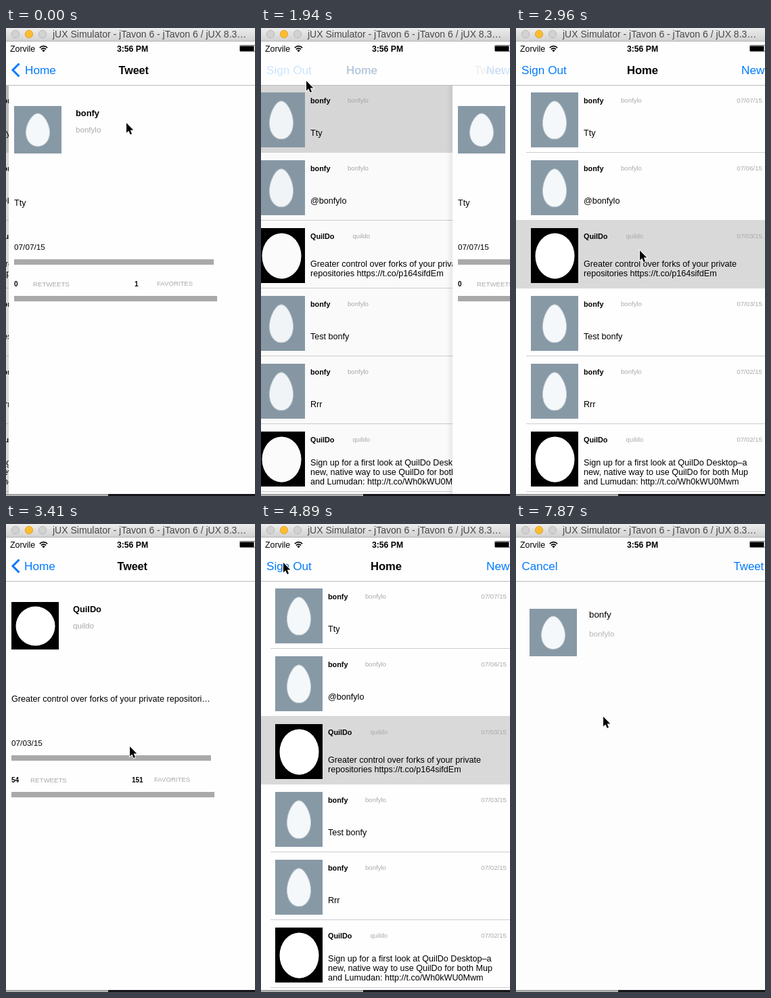
These frames come from a looping animation (368x690 px, 8000 ms). An HTML page:

```html
<!DOCTYPE html>
<html lang="en">
<head>
<meta charset="utf-8">
<title>Timeline app</title>
<style>
html, body { margin: 0; width: 100%; height: 100%; overflow: hidden; background: #fefefe; }
svg { display: block; width: 368px; height: 690px; }
text { font-family: "Liberation Sans", Arial, sans-serif; white-space: pre; }
</style>
</head>
<body>
<svg id="stage" viewBox="0 0 368 690" xmlns="http://www.w3.org/2000/svg"></svg>
<script>
const LOOP = 8000, STEP = 148.1, WIDTH = 375, HEIGHT = 667;
const BLUE = '#007aff', GRAY = '#a9a9a9', PAGE = '#fefefe';

const USERS = {
  egg: { name: 'bonfy', handle: 'bonfylo', handleX: 155 },
  dev: { name: 'QuilDo', handle: 'quildo', handleX: 162.5 }
};
const ROWS = [
  ['egg', '07/07/15', 'Tty'],
  ['egg', '07/06/15', '@bonfylo'],
  ['dev', '07/03/15', 'Greater control over forks of your private', 'repositories https://t.co/p164sifdEm'],
  ['egg', '07/03/15', 'Test bonfy'],
  ['egg', '07/02/15', 'Rrr'],
  ['dev', '07/02/15', 'Sign up for a first look at QuilDo Desktop–a',
    'new, native way to use QuilDo for both Mup', 'and Lumudan: http://t.co/Wh0kWU0Mwm']
];
// Pointer path: time, x, y
const POINTER = [
  [0, 178, 140], [1200, 178, 140], [1481, 60, 78], [1629, 30, 60], [1777, 32, 61],
  [1925, 67, 78], [2221, 165, 275], [2370, 173, 290], [2518, 178, 312], [2666, 183, 328],
  [3860, 183, 328], [3999, 150, 262], [4147, 30, 59], [4443, 30, 59], [4887, 33, 57],
  [5340, 33, 57], [5480, 250, 66], [5628, 339, 60], [6366, 339, 60], [6812, 250, 150],
  [6960, 223, 194], [7109, 165, 235], [7257, 135, 257], [7570, 135, 257],
  [7702, 131, 275], [7850, 129, 284]
];

const tag = (name, attrs, body = '') =>
  `<${name} ${Object.entries(attrs).map(([k, v]) => `${k}="${v}"`).join(' ')}>${body}</${name}>`;
const rect = (x, y, width, height, fill, more = {}) => tag('rect', { x, y, width, height, fill, ...more });
const text = (x, y, str, size, fill = '#000', more = {}) =>
  tag('text', { x, y, 'font-size': size, fill, ...more }, str);
const bold = (x, y, str, size, more = {}) => text(x, y, str, size, '#000', { 'font-weight': 700, ...more });
const group = (id, body, more = {}) => tag('g', { id, ...more }, body);

function avatar(kind, x, y, sy = 1) {
  const art = kind === 'egg'
    ? rect(0, 0, 70, 70, '#8899a6') + tag('path', { fill: '#f5f8fa', stroke: '#c3cdd4', 'stroke-width': .9,
        d: 'M35 11C43 11 52.5 26 52.5 39C52.5 51 45 59.5 35 59.5S17.5 51 17.5 39C17.5 26 27 11 35 11Z' })
    : rect(0, 0, 70, 70, '#000') + tag('circle', { cx: 35.5, cy: 35.5, r: 29, fill: '#fff' });
  return tag('g', { transform: `translate(${x} ${y}) scale(1 ${sy})` }, art);
}

function row([kind, date, ...lines], i) {
  const user = USERS[kind], y = 84 + i * 100;
  return rect(15, y + 99, 360, 1, '#cdcdd0') +
    rect(0, y - 1, WIDTH, 101, '#d9d9d9', { class: 'mark', visibility: 'hidden' }) +
    avatar(kind, 22, y + 11, 81 / 70) +
    bold(100, y + 26.5, user.name, 10.8) +
    text(user.handleX, y + 26, user.handle, 9.6, GRAY) +
    text(364, y + 26, date, 9.7, GRAY, { 'text-anchor': 'end' }) +
    lines.map((s, n) => text(100, y + 75 - 7 * (lines.length - 1) + 14 * n, s, 12.6)).join('');
}

function detail(id, kind, str, date, retweets, favorites) {
  const user = USERS[kind];
  return group(id, avatar(kind, 8, 115) +
    bold(99, 130, user.name, 12.8) +
    text(99, 154, user.handle, 11.6, GRAY) +
    text(8, 262, str, 12.6) +
    text(8, 327, date, 11.8) +
    rect(8, 341, 295, 8, GRAY) + rect(8, 395, 300, 8, GRAY) +
    bold(8, 380.5, retweets, 10) + text(36, 380.5, 'RETWEETS', 9.7, GRAY) +
    bold(186, 380.5, favorites, 10) + text(219, 379.5, 'FAVORITES', 9.6, GRAY));
}

const navLine = rect(0, 84, WIDTH, 1, '#bcbcbe');
const stage = document.getElementById('stage');

stage.innerHTML = `<defs>
  <linearGradient id="bar" x2="0" y2="1"><stop stop-color="#ededed"/><stop offset="1" stop-color="#d2d2d2"/></linearGradient>
  <linearGradient id="edge"><stop stop-opacity="0"/><stop offset="1" stop-opacity=".07"/></linearGradient>
  <linearGradient id="under" x2="0" y2="1"><stop stop-color="#8f8f8f"/><stop offset="1" stop-color="#c4c4c4"/></linearGradient>
  <clipPath id="screen"><rect y="20" width="368" height="667"/></clipPath></defs>` +
  rect(0, 0, 368, 690, PAGE) +
  group('app',
    group('list', rect(0, 84, 490, 603, PAGE) + ROWS.map(row).join('')) +
    rect(0, 84, 368, 603, '#000', { id: 'dim' }) +
    group('tweet', rect(-9, 84, 9, 603, 'url(#edge)') + rect(0, 84, WIDTH, 603, PAGE) +
      detail('first', 'egg', 'Tty', '07/07/15', 0, 1) +
      detail('second', 'dev', 'Greater control over forks of your private repositori…', '07/03/15', 54, 151)) +
    rect(0, 20, 368, 65, PAGE) + navLine +
    group('signOut', text(8, 68, 'Sign Out', 17.2, BLUE)) +
    group('compose', text(333, 68, 'New', 17.2, BLUE)) +
    group('chevron', tag('path', { d: 'M19.5 52.5L10 62L19.5 71.5', fill: 'none', stroke: BLUE, 'stroke-width': 3 })) +
    group('back', text(27, 68, 'Home', 17.2, BLUE)) +
    group('home', bold(164, 68, 'Home', 16.6)) +
    group('title', bold(164.5, 68, 'Tweet', 16.1)) +
    group('modal', rect(0, 20, WIDTH, HEIGHT, '#fdfdfd') + navLine +
      text(8.5, 68, 'Cancel', 17, BLUE) + text(321.5, 68, 'Tweet', 16.8, BLUE) +
      avatar('egg', 20, 125) +
      text(108, 137.5, USERS.egg.name, 13.3) + text(108, 166, USERS.egg.handle, 11.6, '#b4b4b4')),
    { 'clip-path': 'url(#screen)' }) +
  // status bar
  text(6, 34.5, 'Zorvile', 12.4) + bold(164, 34.5, '3:56 PM', 12.2) +
  tag('path', { d: 'M49.8 29.2Q55.5 24 61.2 29.2M51.9 31.5Q55.5 28.3 59.1 31.5', fill: 'none', stroke: '#000', 'stroke-width': 1.7 }) +
  tag('path', { d: 'M53.3 33Q55.5 31 57.7 33L55.5 35.4Z' }) +
  rect(345.5, 25.5, 24, 9, '#fff', { stroke: '#777', rx: 1 }) + rect(346, 26.5, 20.5, 7.5, '#000') +
  // window frame
  rect(0, 0, 368, 19, 'url(#bar)') + rect(0, 19, 368, 1, '#b4b4b4') +
  ['#d2d2d2', '#fdbd2e', '#d2d2d2'].map((fill, i) => tag('circle',
    { cx: 14 + 20 * i, cy: 9, r: 5.6, fill, stroke: i === 1 ? '#dfa023' : '#b4b4b4', 'stroke-width': .9 })).join('') +
  text(69, 14, 'jUX Simulator - jTavon 6 - jTavon 6 / jUX 8.3…', 14, '#484848') +
  rect(0, 687, 368, 3, 'url(#under)') + rect(151, 687, 217, 3, '#17161a') +
  group('pointer', tag('path', { d: 'M0 0V14.5L3.3 11.5L5.7 17L8 16L5.7 10.6H10.3Z',
    stroke: '#fff', 'stroke-width': 1.8, 'paint-order': 'stroke' }));

const el = {};
stage.querySelectorAll('[id]').forEach(node => el[node.id] = node);
const marks = [...stage.querySelectorAll('.mark')];

const clamp = v => Math.max(0, Math.min(1, v));
const move = (node, x, y = 0) => node.setAttribute('transform', `translate(${Math.round(x)} ${Math.round(y)})`);
const fade = (node, a) => node.setAttribute('opacity', clamp(a).toFixed(3));
const show = (node, on) => node.setAttribute('visibility', on ? 'visible' : 'hidden');

// Critically damped spring from 0 to 1
function spring(t, start) {
  const s = (t - start) / 1000;
  if (s <= 0) return 0;
  return s > .53 ? 1 : 1 - (1 + 16 * s) * Math.exp(-16 * s);
}

function pointerAt(t) {
  const i = POINTER.findIndex(p => p[0] > t);
  if (i < 0) return POINTER[POINTER.length - 1].slice(1);
  const [t0, x0, y0] = POINTER[i - 1], [t1, x1, y1] = POINTER[i];
  const k = (t - t0) / (t1 - t0);
  return [x0 + (x1 - x0) * k, y0 + (y1 - y0) * k];
}

function draw(ms) {
  const t = Math.floor((ms % LOOP) / STEP) * STEP;
  const open = clamp(spring(t, -405) - spring(t, 1755) + spring(t, 2820) - spring(t, 4484));
  const p = 1 - open, later = t > 2660;

  move(el.list, -.3 * WIDTH * open);
  fade(el.dim, .1 * Math.pow(open, 1.3));
  move(el.tweet, WIDTH * p);
  show(el.tweet, p < .98);
  el.first.setAttribute('display', later ? 'none' : 'inline');
  el.second.setAttribute('display', later ? 'inline' : 'none');
  marks.forEach((m, i) => show(m, i === (later ? 2 : 0)));

  const slide = 137 * Math.pow(p, 1.15), late = (p - .7) / .28;
  const pressed = t > 5900 && t < 6300;
  fade(el.signOut, late);
  fade(el.compose, pressed ? .45 : late);
  fade(el.chevron, 1 - 1.5 * p);
  move(el.back, slide);
  fade(el.back, 1 - p / .98);
  move(el.home, slide - 137);
  fade(el.home, late * .6 + (p > .98 ? .4 : 0));
  move(el.title, 200 * p);
  fade(el.title, 1 - 1.26 * p);

  const rise = spring(t, 6165.6);
  show(el.modal, rise > 0);
  move(el.modal, 0, HEIGHT * (1 - rise));
  move(el.pointer, ...pointerAt(t));
}

const begin = performance.now();
function tick() {
  draw(performance.now() - begin);
  requestAnimationFrame(tick);
}
draw(0);
requestAnimationFrame(tick);
</script>
</body>
</html>
```
